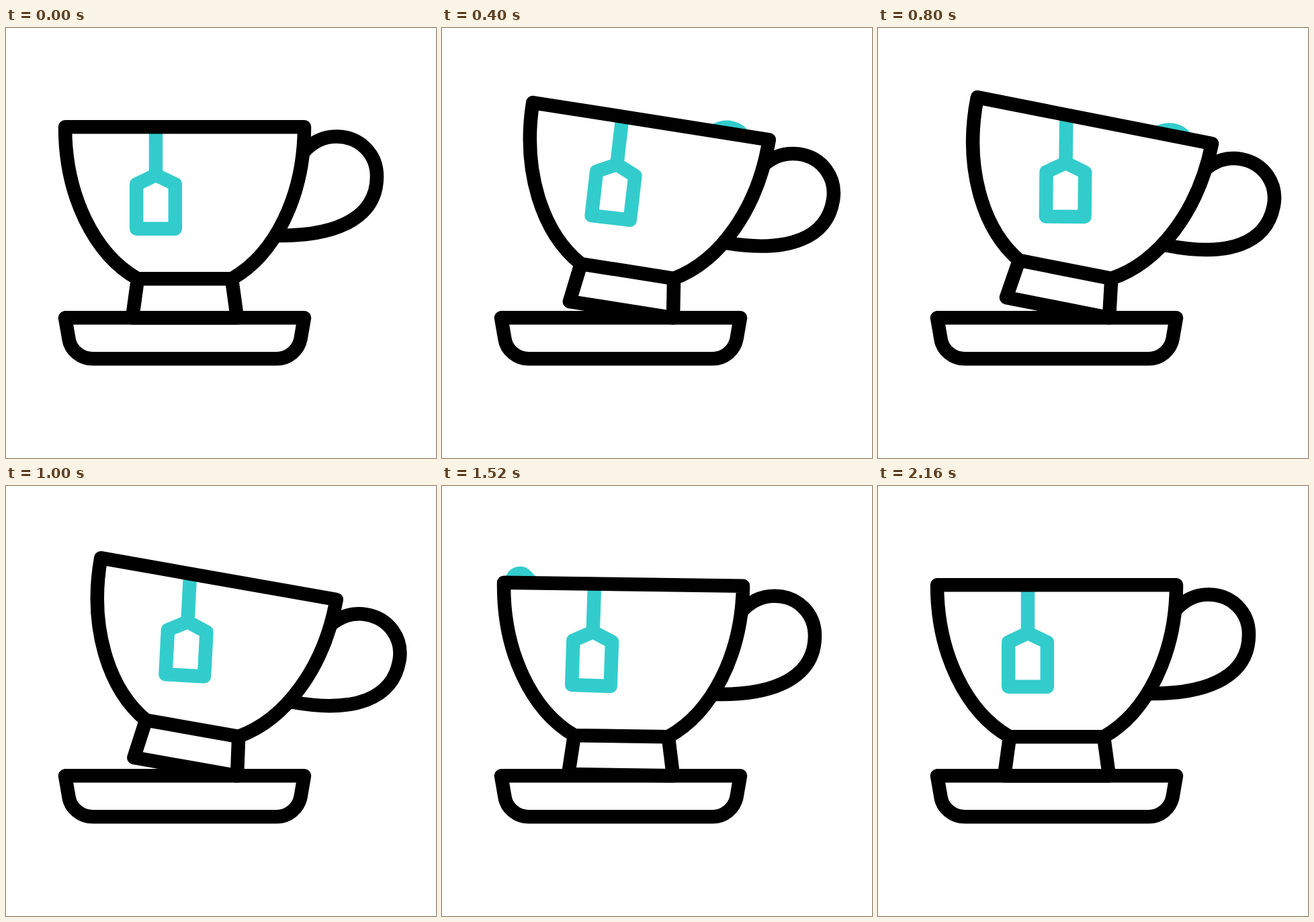
Recreate the animation shown at these times as an HTML page. Size 640 px wide and 640 px high, loop 2.32 s.

```html
<!DOCTYPE html>
<html lang="en">
<head>
<meta charset="utf-8">
<title>Tea cup</title>
<style>
  html, body { margin: 0; width: 100%; height: 100%; overflow: hidden; background: #fff; }
  svg { display: block; width: 100vw; height: 100vh; }
  .ink, .tea { fill: none; stroke-width: 20.5; stroke-linejoin: round; }
  .ink { stroke: #000; }
  .tea { stroke: #3cc; }
</style>
</head>
<body>
<svg viewBox="0 0 640 640">
  <defs>
    <path id="bowl" d="M88 147.3H444C444 250 400 337 336 373.3H196C132 337 88 250 88 147.3Z"/>
  </defs>
  <path class="ink" d="M88 431.3H444L438.5 463C435 480 420 492.3 403 492.3H129C112 492.3 96 480 93.5 463Z"/>
  <g id="cup">
    <path class="ink" d="M441 187C454 171 471 161.5 492 161.5C526 161.5 552 187 552 221C552 278 500 309 408 309H396"/>
    <path class="tea" id="right"/>
    <path class="tea" id="left"/>
    <use href="#bowl" fill="#fff"/>
    <g class="tea" id="bag">
      <path d="M223 147.3V219"/>
      <path d="M223 218.8L251.8 232.6V298.8H194.2V232.6Z"/>
    </g>
    <path class="ink" d="M196 373.3L188 431.3H344L336 373.3"/>
    <use href="#bowl" class="ink"/>
  </g>
</svg>
<script>
const LOOP = 2320, STEP = 40, SURFACE = 165;
const el = id => document.getElementById(id);

// Cubic ease-in-out with handles at .42 and .58
function ease(u) {
  let lo = 0, hi = 1, s = 0.5;
  for (let i = 0; i < 24; i++) {
    s = (lo + hi) / 2;
    const x = 3 * s * (1 - s) * (0.42 * (1 - s) + 0.58 * s) + s ** 3;
    if (x < u) lo = s; else hi = s;
  }
  return s * s * (3 - 2 * s);
}

// Eased 0 to 1 between two times
function ramp(t, from, to) {
  if (t <= from) return 0;
  return t >= to ? 1 : ease((t - from) / (to - from));
}

function spin(id, angle, x, y) {
  el(id).setAttribute("transform", `rotate(${angle} ${x} ${y})`);
}

// A crest at x, risen above the surface, leaning forward the higher it gets;
// a negative width makes it face left
function wave(id, x, rise, width) {
  const y = SURFACE - rise;
  const p = (dx, dy) => `${x + width * dx} ${y + dy} `;
  el(id).setAttribute("visibility", rise > 0 ? "visible" : "hidden");
  el(id).setAttribute("d",
    "M" + p(-57 - 0.48 * rise, 0.8 * rise) +
    "C" + p(-4 - 0.55 * rise, 0.67 * rise) + p(-12 - 0.26 * rise, 1) + p(0, 0) +
    "C" + p(18 + 0.12 * rise, 0) + p(33 - 0.2 * rise, 0.37 * rise) + p(43 - 0.45 * rise, rise + 10));
}

function draw(t) {
  const tilt = 15 * ramp(t, 200, 560) - 5 * ramp(t, 560, 920) - 10 * ramp(t, 1240, 1590);
  const lag = -13 * ramp(t, 300, 640) + 6 * ramp(t, 640, 1000);
  const settle = 10 * ramp(t, 1240, 1640) - 7 * ramp(t, 1640, 1860)
    + 5.2 * ramp(t, 1860, 2020) - 1.2 * ramp(t, 2020, 2160);
  const surge = ramp(t, 200, 620) - ramp(t, 620, 960);
  const backwash = ramp(t, 1240, 1640) - ramp(t, 1640, 1800);

  spin("cup", tilt, 344, 431.3);
  spin("bag", lag + settle, 223, 147.3);
  wave("right", 357 + 54 * surge, 58 * surge, 1);
  wave("left", 113, 39 * backwash, -0.6);
}

const start = performance.now();
function tick() {
  const t = (performance.now() - start) % LOOP;
  draw(Math.floor(t / STEP) * STEP);
  requestAnimationFrame(tick);
}
tick();
</script>
</body>
</html>
```
